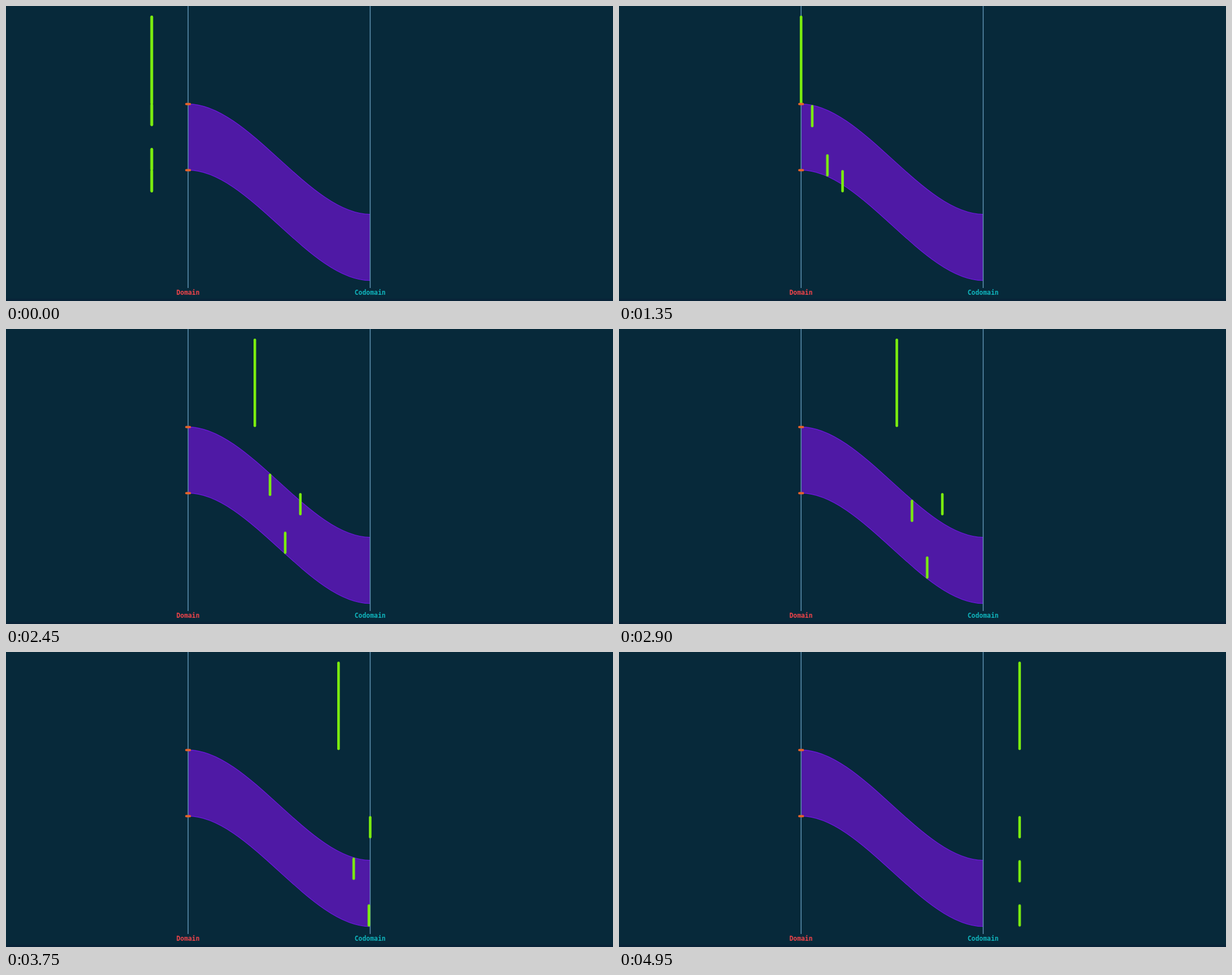
Animation of 1074x522 px, one loop 5 s. Source, as an HTML page:

```html
<!DOCTYPE html>
<html lang="en">
<head>
<meta charset="utf-8">
<title>Domain and codomain</title>
<style>
  html, body { margin: 0; width: 100%; height: 100%; overflow: hidden; background: #07293a; }
  svg { display: block; width: 1074px; height: 522px; }
  text { font: bold 11.4px "DejaVu Sans Mono", monospace; text-anchor: middle; }
  .axis { stroke: #5f93b3; stroke-width: 1.5; }
  .edge { fill: none; stroke: #6c17de; stroke-width: 1.2; }
  .mark { stroke: #e8622a; stroke-width: 4; stroke-linecap: round; }

  /* One unit of time is 1/7 of 99%: approach 1, staggered departure 1, crossing 4, exit 1. */
  .bars { fill: #7bed0f; }
  .bars rect { x: -2.3px; width: 4.6px; rx: 2.3px; animation: 5s linear infinite; }
  .small { height: 39.45px; }
  .outside { height: 156.6px; }
  .bars .p1 { animation-name: cross1; }
  .bars .p2 { animation-name: cross2, sink2; }
  .bars .p3 { animation-name: cross3, sink3; }
  .bars .p4 { animation-name: cross4; }
  .bars .whole { animation-name: cross1, split; }

  @keyframes cross1 {
    0% { translate: 257.76px; }
    14.142857%, 28.285714% { translate: 322.2px; }
    84.857143% { translate: 644.4px; }
    99%, 100% { translate: 708.84px; }
  }
  @keyframes cross2 {
    0% { translate: 257.76px; }
    14.142857%, 23.571429% { translate: 322.2px; }
    80.142857%, 84.857143% { translate: 644.4px; }
    99%, 100% { translate: 708.84px; }
  }
  @keyframes cross3 {
    0% { translate: 257.76px; }
    14.142857%, 18.857143% { translate: 322.2px; }
    75.428571%, 84.857143% { translate: 644.4px; }
    99%, 100% { translate: 708.84px; }
  }
  @keyframes cross4 {
    0% { translate: 257.76px; }
    14.142857% { translate: 322.2px; }
    70.714286%, 84.857143% { translate: 644.4px; }
    99%, 100% { translate: 708.84px; }
  }
  @keyframes sink2 {
    0% { transform: translateY(0); }
    23.571429% { transform: translateY(0); animation-timing-function: cubic-bezier(.33333, 0, .66667, 1); }
    80.142857%, 100% { transform: translateY(195.25px); }
  }
  @keyframes sink3 {
    0% { transform: translateY(0); }
    18.857143% { transform: translateY(0); animation-timing-function: cubic-bezier(.33333, 0, .66667, 1); }
    75.428571%, 100% { transform: translateY(195.25px); }
  }
  @keyframes split {
    0% { opacity: 1; animation-timing-function: step-end; }
    14.142857%, 100% { opacity: 0; }
  }
</style>
</head>
<body>
<svg viewBox="0 0 1074 522">
  <rect width="1074" height="522" fill="#07293a"/>
  <rect y="518" width="1074" height="4" fill="#082338"/>

  <path fill="#4f19a5" d="M322.2 173.3C429.6 173.3 537 368.55 644.4 368.55V485.7C537 485.7 429.6 290.45 322.2 290.45Z"/>
  <path class="edge" d="M322.2 173.3C429.6 173.3 537 368.55 644.4 368.55M322.2 290.45C429.6 290.45 537 485.7 644.4 485.7"/>

  <path class="axis" d="M322.2 0V499M644.4 0V499"/>
  <text x="322" y="510.5" fill="#f0444a">Domain</text>
  <text x="644.2" y="510.5" fill="#10b5bd">Codomain</text>

  <g class="bars">
    <rect class="p1 outside" y="16.9"/>
    <rect class="p2 small" y="173.1"/>
    <rect class="p3 small" y="251.2"/>
    <rect class="p4 small" y="290.25"/>
    <rect class="whole" y="16.9" height="195.65"/>
    <rect class="whole" y="251.2" height="78.5"/>
  </g>

  <path class="mark" d="M319 173.4H325.4M319 290.5H325.4"/>
</svg>
</body>
</html>
```
